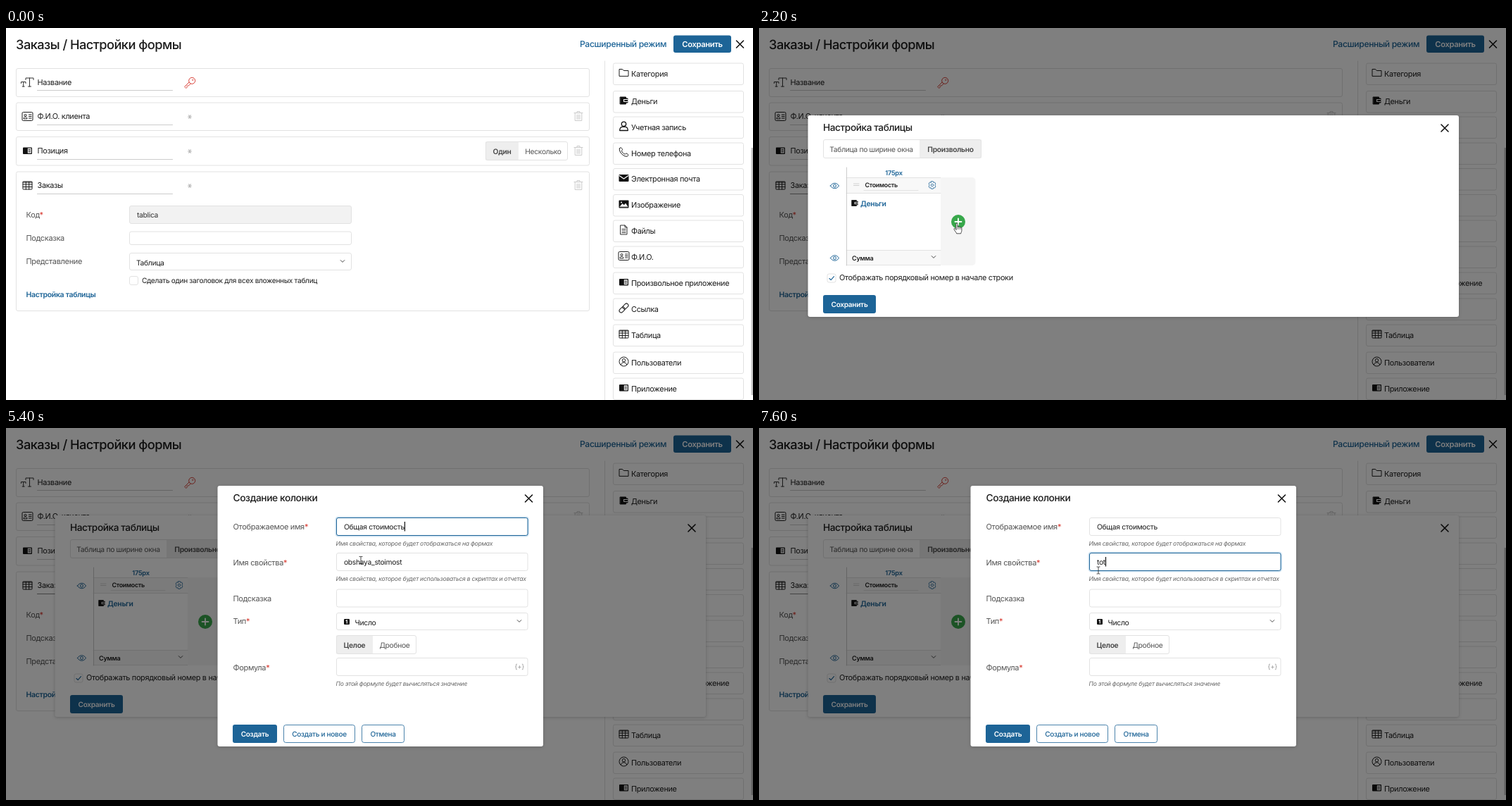
Animation of 1061 by 528 pixels, one loop 8 s. Source, as an HTML page:

```html
<!DOCTYPE html>
<html lang="ru">
<head>
<meta charset="utf-8">
<title>Настройка формы</title>
<style>
html, body { margin: 0; width: 100%; height: 100%; overflow: hidden; background: #fff; }
svg { display: block; width: 100vw; height: 100vh; }
text { font-family: Inter, sans-serif; letter-spacing: -.03em; white-space: pre; text-rendering: geometricPrecision; }
.menu { font-family: "Open Sans", sans-serif; letter-spacing: 0; }
.shadow { filter: drop-shadow(0 1px 2px rgba(0, 0, 0, .2)); }
</style>
</head>
<body>
<svg id="stage" viewBox="0 0 1061 528" preserveAspectRatio="none"></svg>
<script>
const LOOP = 8000, FPS = 15;
const BLUE = '#1d6497', HOVER = '#3880b4', INK = '#1c1c1c', SOFT = '#555', LINE = '#e2e2e2', RED = '#d8382f';

// Text is placed by its left edge and the middle of its capitals.
const text = (x, y, s, size = 10.9, fill = INK, weight = 400, attrs = '') =>
  `<text x="${x}" y="${y + size * .36}" font-size="${size}" fill="${fill}" font-weight="${weight}" ${attrs}>${s}</text>`;
const rect = (x, y, w, h, fill = '#fff', stroke = 'none', r = 0, attrs = '') =>
  `<rect x="${x}" y="${y}" width="${w}" height="${h}" rx="${r}" fill="${fill}" stroke="${stroke}" ${attrs}/>`;
const path = (d, stroke = INK, width = 1, fill = 'none') =>
  `<path d="${d}" stroke="${stroke}" stroke-width="${width}" fill="${fill}" stroke-linejoin="round" stroke-linecap="round"/>`;
const ring = (x, y, r, stroke = INK, fill = 'none', width = 1) =>
  `<circle cx="${x}" cy="${y}" r="${r}" fill="${fill}" stroke="${stroke}" stroke-width="${width}"/>`;
const at = (x, y, body, scale = 1) => `<g transform="translate(${x} ${y}) scale(${scale})">${body}</g>`;
const group = (id, body, attrs = '') => `<g id="${id}" ${attrs}>${body}</g>`;
const box = (x, y, w, h, fill = '#fff') => rect(x + .5, y + .5, w - 1, h - 1, fill, LINE, 2.5);
const cross = (x, y) => path(`M${x - 5} ${y - 5}l10 10m0-10l-10 10`, '#111', 1.6);
const chevron = (x, y) => path(`M${x - 2.8} ${y - 1.4}l2.8 2.8l2.8-2.8`, '#333', .9);
const star = `<tspan fill="${RED}">*</tspan>`;
const button = (x, y, w, h, label, size = 10, id = '') =>
  `<rect id="${id}" x="${x}" y="${y}" width="${w}" height="${h}" rx="3" fill="${BLUE}"/>` +
  text(x + w / 2, y + h / 2 + .5, label, size, '#fff', 600, 'text-anchor="middle"');
const ghost = (x, y, w, label) => rect(x + .5, y + .5, w - 1, 25, '#fff', BLUE, 3, 'stroke-width=".8"') +
  text(x + w / 2, y + 13.5, label, 10, BLUE, 500, 'text-anchor="middle"');
const toggle = (x, y, w, split, active, left, right) => {
  const cell = (cx, cw, label, on) =>
    (on ? rect(cx, y + .5, cw, 26, '#eee') : '') +
    text(cx + cw / 2, y + 14, label, 10.3, on ? '#444' : SOFT, on ? 600 : 400, 'text-anchor="middle"');
  return cell(x, split, left, active === 0) + cell(x + split, w - split, right, active === 1) +
    rect(x + .5, y + .5, w - 1, 26, 'none', LINE, 2.5);
};

const icons = {
  folder: path('M-6.5 4.5v-9.5h4.5l1.8 2h6.7v7.500z'),
  wallet: path('M-5-5h8v2h2.500v6h-2.500v2h-8z', '#111', 1, '#111') + rect(-.5, -2, 6.5, 4, '#fff') +
    rect(.7, -1, 4.8, 2, '#111'),
  user: ring(0, -3.2, 3.2, '#111', 'none', 1.3) + path('M-5.8 6c0-4 2-5.200 4-5.200h3.600c2 0 4 1.200 4 5.200z', '#111', 1.3),
  phone: path('M-6-5.500c1-2 3-1.500 4 1.500c0 1-1.300 1.300-1 2.200c.6 1.800 2.600 3.800 4.400 4.300c1 .2 1.200-1 2.200-1c3 1 3.500 3 1.500 4c-4 2-13-6-11.100-11z'),
  mail: rect(-7, -5, 14, 10, '#111', 'none', 1) + path('M-6.500-3.500l6.500 4.500l6.500-4.500', '#fff', 1.2),
  image: rect(-7, -5.500, 14, 11, '#111', 'none', 1) + path('M-5.500 3.500l3.500-4l2.500 2l2-2.500l3 4.500z', '#fff', .5, '#fff') + ring(-3.5, -2.500, 1, 'none', '#fff'),
  file: path('M-4.500-6.500h6l3 3v10h-9zM1.500-6.500v3h3M-2.500-1h5m-5 2.500h5m-5 2.500h5', INK, .9),
  card: rect(-7.500, -6, 15, 12, 'none', INK, 1.5) + ring(-3, -1.600, 1.500) + path('M-5.500 3c0-3.300 5-3.300 5 0zM2-2.500h3.500m-3.500 2.500h3.500m-3.500 2.500h3.500'),
  book: rect(-6.500, -4.500, 13, 9.500, '#111', 'none', 1) + rect(.3, -3.300, 5, 7, '#fff') + path('M1.500-1.500h2.500m-2.500 1.700h2.500m-2.500 1.700h2.500', '#111', .8),
  link: `<g transform="rotate(-45)">${rect(-8, -2.700, 9, 5.400, 'none', INK, 2.700)}${rect(-1, -2.700, 9, 5.400, 'none', INK, 2.700)}</g>`,
  table: rect(-6.500, -5.500, 13, 11, 'none', INK, .5) + path('M-6.500-4.500h13M-6.500-1.500h13m-13 3.500h13M-2.200-5v10.500m4.400-10.500v10.500'),
  account: ring(0, 0, 6.500) + ring(0, -1.800, 2.200) + path('M-4 4.500c0-4.500 8-4.500 8 0'),
  letters: path('M-9 1.500v-2h6.500v2M-5.800-.5v6.500m-1.500 0h3M-2.500-3.500v-2.500h11v2.500M3-6v12m-2 0h4', '#333'),
  key: `<g transform="rotate(-45)">${ring(4.500, 0, 4.500, RED, 'none', .9)}${ring(6, 0, .8, RED, 'none', .7)}${path('M0-1.400h-9v3h2.500v-1.200h2v1.200h4.500', RED, .9)}</g>`,
  trash: path('M-6-4.500h12M-2-4.500v-2h4v2M-4.800-4.500v11h9.600v-11M-2-2v6.500m2-6.500v6.500m2-6.500v6.500', '#ccc', 1),
  flake: path('M-2.500 0h5M-1.300-2.300l2.600 4.600M1.300-2.300l-2.600 4.600', '#bbb', 1.2),
  eye: path('M-6 0c3-5 9-5 12 0c-3 5-9 5-12 0z', BLUE) + ring(0, 0, 2, BLUE),
  gear: ring(0, 0, 1.700, BLUE, 'none', .8) + path('M-1.300-5.300h2.600l.5 1.600l1.700-.4l1.400 2.200l-1.100 1.900l1.100 1.900l-1.400 2.200l-1.700-.4l-.5 1.600h-2.600l-.5-1.600l-1.700.4l-1.400-2.200l1.100-1.900l-1.100-1.900l1.400-2.200l1.700.4z', BLUE, .8),
  number: rect(-4, -4, 8, 8, '#111', 'none', 1.2) + path('M-1-1.500l1.200-.8v4.500', '#fff', 1.1)
};
const icon = (name, x, y, scale) => at(x, y, icons[name], scale);

function page() {
  const row = (y, h, name, label, line) => box(14, y, 815, h) + icon(name, 30.5, y + 20) +
    text(44.5, y + 20, label) + path(`M44.500 ${line}.500h192`, '#ccc');
  const extras = y => icon('flake', 261, y + 1) + icon('trash', 813, y);
  const palette = [['Категория', 'folder', 49.5], ['Деньги', 'wallet', 89], ['Учетная запись', 'user', 125.5],
    ['Номер телефона', 'phone', 162.5], ['Электронная почта', 'mail', 199], ['Изображение', 'image', 236],
    ['Файлы', 'file', 272.5], ['Ф.И.О.', 'card', 309.5], ['Произвольное приложение', 'book', 346.5],
    ['Ссылка', 'link', 383.5], ['Таблица', 'table', 420.5], ['Пользователи', 'account', 459.5], ['Приложение', 'book', 496.5]];
  return rect(0, 0, 1061, 528) +
    text(14, 23.5, 'Заказы / Настройки формы', 18.25, INK, 500) +
    text(815, 23, 'Расширенный режим', 12.15, BLUE, 500) +
    button(948, 10.5, 82, 24.5, 'Сохранить', 11.2) + cross(1042.5, 23) +
    row(57, 41, 'letters', 'Название', 88) + icon('key', 261, 78) +
    row(105.5, 40.5, 'card', 'Ф.И.О. клиента', 137) + extras(125) +
    row(154, 41.5, 'book', 'Позиция', 186) + extras(174) +
    toggle(681, 161, 117, 47, 0, 'Один', 'Несколько') +
    row(203.5, 198.5, 'table', 'Заказы', 235) + extras(223) +
    group('activeLine', path('M44.500 235.500h192', '#888')) +
    text(28.5, 265.5, 'Код' + star, 11, SOFT) + text(28.5, 298.5, 'Подсказка', 11, SOFT) +
    text(28.5, 331.5, 'Представление', 11, SOFT) +
    box(175, 252, 316, 26, '#f2f2f2') + text(186, 265.5, 'tablica', 10.3, '#333') +
    box(175, 288.5, 316, 19.5) + box(175, 319, 316, 25) + text(185, 333, 'Таблица', 10.3) + chevron(478, 331) +
    box(175, 352, 13, 13) + text(193, 358, 'Сделать один заголовок для всех вложенных таблиц', 10.15) +
    text(28.5, 378.5, 'Настройка таблицы', 10.5, BLUE, 600, 'id="link"') +
    path('M850.500 47v481', '#e2e2e2') + rect(1058.5, 170, 2.5, 351, '#c4c4c4') +
    palette.map(([label, name, y]) => box(862, y, 186, 31.5) + icon(name, 877.5, y + 14) +
      text(888, y + 15.5, label)).join('');
}

function tableModal() {
  return rect(69.5, 124, 924.5, 286, '#fff', 'none', 3, 'class="shadow"') +
    text(91, 141.5, 'Настройка таблицы', 13.65, INK, 500) + group('tableClose', cross(974, 142)) +
    toggle(91, 158, 225, 137, 1, 'Таблица по ширине окна', 'Произвольно') +
    text(191.5, 205.5, '175px', 9.3, BLUE, 600, 'text-anchor="middle"') +
    rect(256, 212, 51.5, 125, '#f5f5f5', 'none', 5) + rect(124, 212.5, 134, 124.5) +
    rect(124, 212.5, 134, 22, '#f8f8f8') + rect(124, 316, 134, 21, '#f8f8f8') +
    path('M124 212.500h134M124 234.500h134M124 315.500h134M124 336.500h134M149 230.500h77', LINE) + path('M124.500 198v139', '#ccc') +
    path('M134.500 221h7.500m-7.500 2.500h7.500', '#ccc', .9) +
    text(150.5, 222.5, 'Стоимость', 8.9, INK, 600) + icon('gear', 246, 223) +
    icon('eye', 107.5, 224) + icon('eye', 107.5, 326.5) +
    icon('wallet', 136, 248.5, .8) + text(144, 248.8, 'Деньги', 10.4, BLUE, 600) +
    text(132, 326.5, 'Сумма', 9.1, INK, 600) + chevron(248, 325) +
    ring(283, 275, 10, 'none', '#38a84b') + path('M278.500 275h9m-4.500-4.500v9', '#fff', 1.8) +
    box(96.5, 348.5, 13, 13) + path('M100 355.500l2.200 2.200l4.300-5', BLUE, 1.1) +
    text(114, 354.5, 'Отображать порядковый номер в начале строки') +
    button(91, 379, 75, 26, 'Сохранить', 10.1, 'save') +
    group('menu', rect(243, 200, 66.5, 57, '#fff', 'none', 2, 'class="shadow"') +
      group('menuHover', rect(243, 229, 66.5, 28, '#eee')) +
      text(254, 215.5, 'Данные', 10.4, '#444', 400, 'class="menu"') +
      text(254, 243.5, 'Формула', 10.4, '#444', 400, 'class="menu"'));
}

function columnDialog() {
  const label = (y, s) => text(322.5, y, s, 11, SOFT);
  const hint = (y, s) => text(468.5, y, s, 8.6, '#666', 400, 'font-style="italic"');
  const focus = (id, y) => group(id, rect(468.5, y - .5, 273.5, 27, 'none', '#cfe3f2', 3.5, 'stroke-width="2"') +
    rect(469.5, y + .5, 271.5, 25, '#fff', BLUE, 2.5));
  return rect(300.5, 82, 462.5, 370, '#fff', 'none', 3, 'class="shadow"') +
    text(322.5, 99.5, 'Создание колонки', 13.8, INK, 500) + group('dialogClose', cross(742.5, 100)) +
    label(140.5, 'Отображаемое имя' + `<tspan id="nameStar" fill="${RED}">*</tspan>`) + label(191, 'Имя свойства' + star) +
    label(242, 'Подсказка') + label(274.5, 'Тип' + star) + label(340, 'Формула' + star) +
    [127, 177, 228.5, 326].map(y => box(469, y, 272.5, 26)).join('') + box(469, 262, 272.5, 25) +
    focus('focusName', 127) + focus('focusCode', 177) +
    hint(163.5, 'Имя свойства, которое будет отображаться на формах') +
    hint(213.5, 'Имя свойства, которое будет использоваться в скриптах и отчетах') +
    hint(363, 'По этой формуле будет вычисляться значение') +
    group('typeString', icon('letters', 484, 274, .8) + text(495.5, 276.5, 'Строка', 10.4)) +
    group('typeNumber', icon('number', 484, 275) + text(495.5, 276.5, 'Число', 10.4)) + chevron(729, 274) +
    toggle(469, 294, 114, 52, 0, 'Целое', 'Дробное') +
    text(722.5, 338.5, '{+}', 9.5, '#999') +
    rect(480, 183, 0, 13, '#3a8fe6', 'none', 0, 'id="selection"') +
    text(480, 140.5, '', 10.3, INK, 400, 'id="name"') +
    text(480, 190, '<tspan></tspan><tspan fill="#fff"></tspan>', 10.3, INK, 400, 'id="code"') +
    rect(480, 133, 1.2, 13.5, '#111', 'none', 0, 'id="caret"') +
    button(322, 421, 63, 26, 'Создать') + ghost(394, 421, 102, 'Создать и новое') + ghost(505, 421, 61, 'Отмена');
}

const cursors = {
  arrow: path('M0 0v10.500l2.400-2.200l1.700 3.800l1.700-.8l-1.700-3.600h3.200z', '#222', .8, '#fff'),
  hand: path('M-1.200 1c0-1.300 2.200-1.300 2.200 0v4.500c.5-.8 1.900-.6 2 .3c.6-.8 1.900-.5 2 .4c.7-.6 1.900-.3 1.900.8v3.500c0 2-1 2.500-1.200 4.300h-6c-.3-1.800-2.500-3.300-3.600-6c-.6-1.300 1-2 1.800-.8l.9 1.200z', '#222', .8, '#fff') +
    path('M1 6v2.500m2-2.200v2.200m2-1.900v1.900', '#222', .6),
  beam: path('M-2-5h1.500l.5.500l.5-.5h1.500M0-4.500v9M-2 5h1.500l.5-.5l.5.5h1.500', '#333', .9)
};

const stage = document.getElementById('stage');
stage.innerHTML = group('page', page()) + group('shade1', rect(0, 0, 1061, 528, '#000', 'none', 0, 'opacity=".5"')) +
  group('tableModal', tableModal()) + group('shade2', rect(0, 0, 1061, 528, '#000', 'none', 0, 'opacity=".5"')) +
  group('columnDialog', columnDialog()) +
  group('pointer', Object.entries(cursors).map(([id, body]) => group(id, body)).join(''));

const el = id => document.getElementById(id);
const show = (id, on) => { el(id).style.visibility = on ? 'inherit' : 'hidden'; };

// time, x, y
const moves = [[130, 4, 428], [530, 111, 382], [1530, 111, 382], [2200, 281, 277], [2930, 281, 277], [3400, 281, 242],
  [5000, 281, 243], [5400, 504, 187.5], [5730, 565, 190], [5800, 565, 190], [6200, 484, 190], [6330, 484, 190],
  [6470, 477, 198], [6670, 477, 198], [6730, 482, 202], [LOOP, 482, 202]];
// time, cursor shape
const shapes = [[0, 'arrow'], [470, 'hand'], [1670, 'arrow'], [2130, 'hand'], [2530, 'arrow'], [3270, 'hand'],
  [3930, 'arrow'], [5340, 'beam']];
const codes = [[0, ''], [5070, 'obshaya_stoimost'], [7200, 't'], [7270, 'to'], [7600, 'tot']];
const current = (table, t) => table.filter(([start]) => start <= t).pop()[1];

function position(t) {
  const i = Math.max(1, moves.findIndex(([time]) => time >= t));
  const [t0, x0, y0] = moves[i - 1], [t1, x1, y1] = moves[i];
  const k = Math.max(0, (t - t0) / (t1 - t0));
  return [x0 + (x1 - x0) * k, y0 + (y1 - y0) * k];
}

function render(t) {
  const [x, y] = position(t), between = (a, b) => t >= a && t < b;
  const dialog = t >= 3930, inCode = t >= 5800;
  show('activeLine', t >= 1000);
  el('link').setAttribute('fill', between(470, 1200) ? HOVER : BLUE);
  show('shade1', t >= 1200 && !dialog);
  show('tableModal', t >= 1200);
  show('tableClose', t >= 1270);
  el('save').setAttribute('fill', between(1200, 1670) ? HOVER : BLUE);
  show('menu', between(2530, 3930));
  show('menuHover', y < 257);
  show('shade2', dialog);
  show('columnDialog', dialog);
  show('dialogClose', t >= 4000);
  show('nameStar', t >= 4070);
  show('typeString', t < 4070);
  show('typeNumber', t >= 4070);
  show('focusName', !inCode);
  show('focusCode', inCode);

  const name = el('name'), code = el('code'), value = current(codes, t);
  name.textContent = t >= 5070 ? 'Общая стоимость' : '';
  const [plain, marked] = code.children;
  plain.textContent = value;
  marked.textContent = '';
  const width = n => n ? code.getSubStringLength(0, n) : 0;
  const full = width(value.length);
  let split = value.length;
  if (between(5870, 7200)) {
    split = t >= 6200 ? 0 : [...value].findIndex((_, i) => 480 + width(i + 1) > x);
    if (split < 0) split = value.length;
  }
  const start = width(split);
  plain.textContent = value.slice(0, split);
  marked.textContent = value.slice(split);
  el('selection').setAttribute('x', 480 + start);
  el('selection').setAttribute('width', full - start);

  const caret = el('caret');
  caret.setAttribute('x', 480 + (inCode ? full : name.getComputedTextLength()));
  caret.setAttribute('y', inCode ? 183 : 133);
  show('caret', !between(4470, 5000) && !between(5870, 7200));

  show('pointer', t >= 130);
  el('pointer').setAttribute('transform', `translate(${x} ${y})`);
  for (const id in cursors) show(id, id === current(shapes, t));
}

const begin = performance.now();
function tick() {
  const elapsed = (performance.now() - begin) % LOOP;
  // The picture advances in fixed steps, with times rounded to 10 ms.
  const step = Math.floor(elapsed * FPS / 1000 + .1);
  render(Math.min(LOOP - 10, Math.round(step * 100 / FPS) * 10));
  requestAnimationFrame(tick);
}
tick();
</script>
</body>
</html>
```
